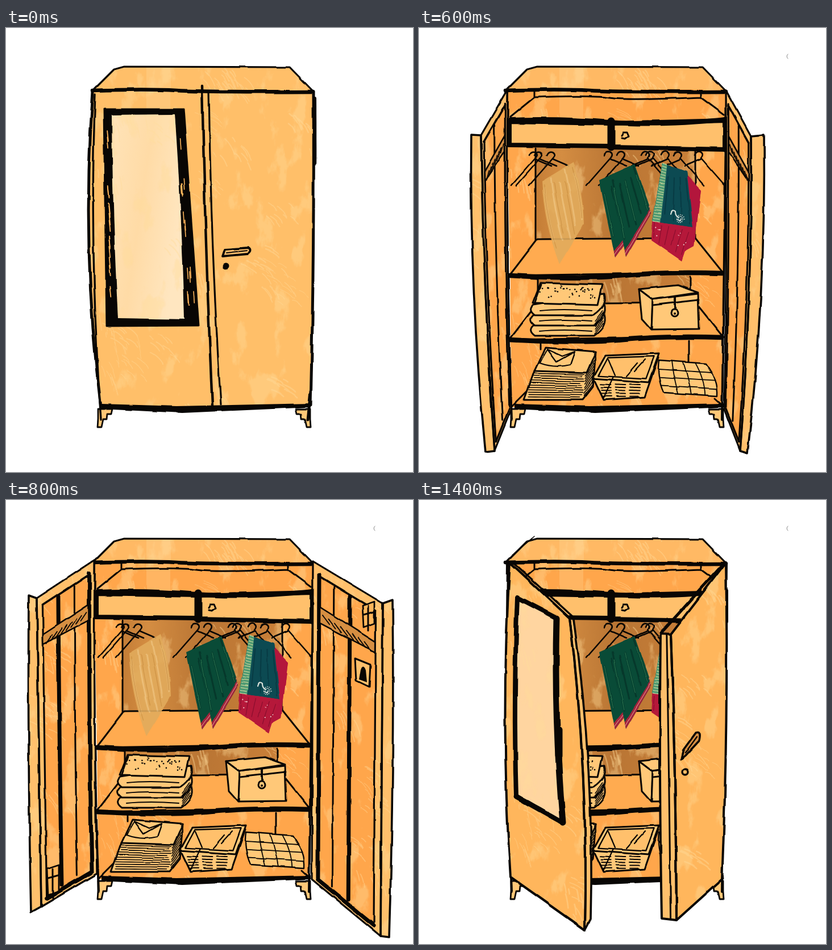
An HTML page for the animation above (1.5 s loop, 716 px wide and 782 px high).

```html
<!DOCTYPE html>
<html lang="en">
<head>
<meta charset="utf-8">
<title>Wardrobe</title>
<style>
html, body { margin: 0; width: 100%; height: 100%; overflow: hidden; background: #fff; }
svg { position: absolute; left: 0; top: 0; width: 716px; height: 782px; }
.layer { opacity: 0; will-change: opacity; }
path { stroke-linecap: round; stroke-linejoin: round; }
</style>
</head>
<body>
<svg viewBox="0 0 716 782">
  <defs>
    <filter id="wobble" filterUnits="userSpaceOnUse" x="0" y="0" width="716" height="782" color-interpolation-filters="sRGB">
      <feTurbulence type="fractalNoise" baseFrequency=".03" numOctaves="1" seed="4"/>
      <feColorMatrix values="1 0 0 0 0  0 1 0 0 0  0 0 1 0 0  0 0 0 0 1" result="noise"/>
      <feDisplacementMap in="SourceGraphic" in2="noise" scale="4" xChannelSelector="R" yChannelSelector="G"/>
    </filter>
    <filter id="wood" filterUnits="userSpaceOnUse" x="0" y="0" width="716" height="782" color-interpolation-filters="sRGB">
      <feTurbulence type="fractalNoise" baseFrequency=".03 .015" numOctaves="5" seed="9"/>
      <feColorMatrix values="0 0 0 0 1  0 0 0 0 .86  0 0 0 0 .6  9 0 0 0 -5.3"/>
    </filter>
    <linearGradient id="glass" x2="1" y2=".4">
      <stop offset="0" stop-color="#ffe3b8"/><stop offset=".5" stop-color="#ffdba6"/><stop offset="1" stop-color="#ffe6c0"/>
    </linearGradient>
    <linearGradient id="back">
      <stop offset="0" stop-color="#c47d36"/><stop offset=".16" stop-color="#d48d42"/>
      <stop offset=".5" stop-color="#b97534"/><stop offset="1" stop-color="#c98039"/>
    </linearGradient>
  </defs>
</svg>
<script>
const LOOP = 1500;
const POSES = [[0, 'shut'], [500, 'ajar'], [600, 'side'], [800, 'wide'], [1300, 'side'], [1400, 'ajar']];
const INK = '#080604', PALE = '#ffc878', EDGE = '#ffc06c', DOOR = '#ffb65c', DEEP = '#ffa64b', BAR = '#d68f42';

let seed = 77;
const rnd = () => (seed = seed * 16807 % 2147483647) / 2147483647;
const span = (a, b) => a + (b - a) * rnd();
const repeat = (n, draw) => Array.from({ length: n }, (_, i) => draw(i, n > 1 ? i / (n - 1) : 0)).join('');

const fill = (d, color) => `<path d="M${d}z" fill="${color}"/>`;
const ink = (d, w = 3, color = INK) => `<path d="M${d}" fill="none" stroke="${color}" stroke-width="${w}"/>`;
const shape = (d, color = PALE, w = 3) => `<path d="M${d}z" fill="${color}" stroke="${INK}" stroke-width="${w}"/>`;
const dot = (x, y, r, color = INK) => `<circle cx="${x}" cy="${y}" r="${r}" fill="${color}"/>`;

// maps (u,v) into four corners; the sides u=0 and u=1 may bulge sideways
function quad(corners, bulge0 = 0, bulge1 = 0) {
  const [ax, ay, bx, by, cx, cy, dx, dy] = corners.split(/[ ,]/).map(Number);
  return (u, v) => {
    const mix = (a, b, c, d) => (1 - v) * (a + (b - a) * u) + v * (d + (c - d) * u);
    const bulge = 4 * v * (1 - v) * (bulge0 + (bulge1 - bulge0) * u);
    return (mix(ax, bx, cx, dx) + bulge).toFixed(1) + ',' + mix(ay, by, cy, dy).toFixed(1);
  };
}
const path = (q, u0, v0, u1, v1) =>
  Array.from({ length: 9 }, (_, i) => q(u0 + (u1 - u0) * i / 8, v0 + (v1 - v0) * i / 8)).join(' ');
const area = (q, u0 = 0, v0 = 0, u1 = 1, v1 = 1) => path(q, u0, v0, u0, v1) + ' ' + path(q, u1, v1, u1, v0);
const down = (q, u, w, v0 = 0, v1 = 1) => ink(path(q, u, v0, u, v1), w);
const across = (q, v, w, u0 = 0, u1 = 1) => ink(path(q, u0, v, u1, v), w);

// loose strokes running down (or across) a quad
const folds = (q, n, w, color) => repeat(n, (i, k) =>
  ink(path(q, .06 + .88 * k, span(.03, .2), .06 + .88 * k, span(.75, .95)), w, color));
const layers = (q, n, w = 1.6) => repeat(n, (i, k) =>
  ink(path(q, span(0, .08), .05 + .9 * k, span(.92, 1), .05 + .9 * k), w));

const marks = repeat(46, () => {
  const x = span(50, 680), y = span(75, 740), a = span(.5, 1.5);
  const strokes = repeat(8, () => {
    const l = span(8, 34), dx = Math.cos(a) * l, dy = Math.sin(a) * l;
    return `M${x + span(-26, 26)},${y + span(-20, 20)}q${dx * .6},${dy * .3} ${dx},${dy}`;
  });
  return ink(strokes.slice(1), span(1, 2.6), '#ffdc9c');
});

function grain(id, ...areas) {
  return `<clipPath id="${id}">${areas.map(a => `<path d="M${a}z"/>`).join('')}</clipPath>
    <g clip-path="url(#${id})"><rect width="716" height="782" filter="url(#wood)" opacity=".4"/>
    <g opacity=".4">${marks}</g><rect x="247" y="66" width="42" height="134" fill="#ffe0a8" opacity=".25"/></g>`;
}

function layer(poses, art) {
  document.body.insertAdjacentHTML('beforeend',
    `<svg class="layer" viewBox="0 0 716 782"><g filter="url(#wobble)">${art}</g></svg>`);
  const frames = POSES.map(([t, pose]) => ({
    offset: t / LOOP, opacity: poses.includes(pose) ? 1 : 0, easing: 'steps(1, end)'
  }));
  frames.push({ ...frames[frames.length - 1], offset: 1 });
  document.body.lastElementChild.animate(frames, { duration: LOOP, iterations: Infinity });
}

const CROWN = '156,107 190,73 208,68 499,69 539,110';
const crown = ink(CROWN, 3.2) + ink('153,110Q250,107 300,110T540,112', 6.5);
const plinth = fill('168,662 300,666 536,661 536,668 310,678 168,671', INK);
const foot = (x, side) =>
  `<g transform="translate(${x} 671) scale(${side} 1)">${shape('0,0v18l-1,14h7l3,-14h6l1,-9h7l2,-9', PALE, 2.8)}</g>`;
const feet = foot(162, 1) + foot(535, -1);

// closed
const body = quad('541,112 153,112 167,668 536,664', 2, -14);
const frame = quad('172,143 312,143 339,524 177,525');
const pane = quad('186,153 297,152 314,513 197,511', -2, 2);
layer(['shut'],
  feet + fill(CROWN, '#ffbf69') + fill(area(body), '#ffbf69') +
  grain('shutGrain', CROWN, area(body)) + crown + plinth +
  down(body, 1, 5) + ink('157,116Q146,390 167,690', 3.4) +
  down(body, 0, 5) + down(body, -.005, 6, .02, .23) + ink('536,640 531,690', 5) +
  ink('345,102Q350,380 363,665', 4.4) + ink('357,112Q360,380 378,663', 3.2) +
  shape(area(frame), INK) + fill(area(pane), 'url(#glass)') + grain('paneGrain', area(pane)) +
  repeat(14, () => { const v = span(.08, .9); return ink(path(frame, .04, v, .05, v + .05), 1.8, DOOR); }) +
  repeat(14, () => { const u = span(.9, .97), v = span(.08, .9); return ink(path(frame, u, v, u, v + .05), 1.6, DOOR); }) +
  shape('381,402 385,390 426,387Q434,392 424,398', EDGE, 3.8) + ink('388,396 424,392', 2) + dot(387, 419, 5.5));

// inside of the wardrobe
function shelf(y) {
  const top = quad(`208,${y - 64} 486,${y - 66} 534,${y - 6} 159,${y}`);
  return fill(area(top), '#ffab50') + ink(area(top) + 'z', 3) + ink(`159,${y}q130,7 200,0t175,-4`, 8.5);
}

function drawer(corners) {
  return shape(area(quad(corners)), EDGE, 8);
}

function hanger(x) {
  const side = x < 390 ? -1 : 1;
  return ink(`${x - 9},224q3,-8 10,-6q7,4 1,11l${side * 42},48M${x + 2},231l${-side * 28},12`, 2.6);
}

const ROOM = '155,108 540,108 533,668 163,668';
const room = fill(CROWN, '#ffb964') + fill(ROOM, DEEP) +
  fill('205,211 485,213 486,372 206,372', 'url(#back)') + fill('209,440 478,435 478,482 209,486', 'url(#back)') +
  grain('roomGrain', CROWN, ROOM) + crown +
  ink('160,157 203,122Q300,118 335,123T495,122L537,153M202,110v13M495,111v11') +
  drawer('159,165 338,168 338,208 159,206') + drawer('340,168 539,163 539,214 340,210') +
  ink('160,162Q250,159 335,166T540,161', 8) + ink('338,164v46', 13) + ink('539,162v52', 10) +
  ink('356,190 359,183 366,183 369,190 362,195 356,194') +
  ink('205,212v160M486,214v156M209,442v42M477,438v42M213,552v14M475,550v38') +
  shelf(436) + shelf(549) + ink('163,667 190,640M520,652 535,666') +
  ink('156,112Q152,400 163,690', 4) + ink('541,112Q536,400 533,690', 4) + plinth;

function blankets() {
  const top = quad('214,449 323,452 315,488 200,485');
  return repeat(3, i => {
    const y = 524 - 18 * i;
    return shape(`201,${y}q-10,9 3,18h104q24,-16 18,-38z`);
  }) + shape(area(top)) + ink('203,487 215,452') +
    repeat(34, () => { const [x, y] = top(span(.05, .95), span(.1, .7)).split(','); return dot(x, y, 1.3); }) +
    repeat(3, i => ink(`212,${498 + 18 * i}q40,-4 92,0`, 2)) + layers(quad('309,518 325,496 325,520 309,540'), 6);
}

function box() {
  return shape('387,460 411,478 409,531 392,512') + shape('411,478 491,468 493,530 409,531') +
    shape('387,460 455,453 491,466 411,478') + ink('412,488 492,479') + ink('450,474v20', 4) +
    `<circle cx="449" cy="502" r="6" fill="${PALE}" stroke="${INK}" stroke-width="3"/>` + dot(449, 503, 2);
}

function linen() {
  const top = quad('222,563 311,570 295,607 203,604');
  return shape('203,604 185,655 288,655 306,632 311,570') + shape(area(top)) +
    ink('226,566 212,590Q240,600 266,593L274,570 252,578zL242,588 274,570', 2.3) +
    layers(quad('200,606 294,608 288,653 186,652'), 11) + layers(quad('294,606 311,578 306,630 289,652'), 9);
}

function basket() {
  const rim = quad('328,577 422,573 404,624 306,617');
  return shape('307,617 325,655 397,650 421,580') + shape(area(rim)) + shape(area(rim, .07, .1, .93, .88), EDGE, 2.4) +
    ink('333,584 345,612M385,590 365,613M342,614 324,653M398,584 380,604', 2.2) +
    repeat(3, i => layers(quad(`${318 + 26 * i},626 ${338 + 26 * i},627 ${338 + 24 * i},650 ${322 + 24 * i},650`), 5, 2));
}

function rumpled() {
  const q = quad('422,585 504,591 524,648 430,642', -4, 6);
  return shape(area(q), PALE, 2.4) + [.28, .52, .78].map(k => down(q, k, 1.8) + across(q, k, 1.8)).join('');
}

function greenCloth() {
  const sheet = corners => {
    const q = quad(corners);
    return fill(area(q), '#094b37') + folds(q, 5, 3, '#06382b') + folds(q, 3, 1, '#2b8056') +
      fill(area(q, 0, .92, 1, 1), '#a3243c') + ink(path(q, 0, .96, 1, .96), 1, '#e7a59a');
  };
  return sheet('317,268 380,240 407,318 345,405') + sheet('336,260 380,240 409,326 364,403');
}

function redCloth() {
  const teal = quad('428,238 471,253 482,350 411,340'), hem = quad('411,340 482,350 462,410 409,374');
  return fill('462,250 496,286 484,384 466,394', '#b3163c') +
    fill(area(teal), '#0c4a52') + folds(teal, 5, 2, '#083b44') +
    fill(area(hem), '#b5183a') + folds(hem, 6, 1.3, '#8c0f2f') +
    fill(area(teal, 0, 0, .2, 1), '#4f9a72') + repeat(22, (i, k) => ink(path(teal, .02, k, .18, k), 1.2, '#c9d59a')) +
    repeat(24, i => dot(459 + Math.cos(i * .55) * (2 + i * .25), 336 + Math.sin(i * .55) * (2 + i * .25), .9, '#dfe4dc')) +
    ink('442,328q2,-9 8,-4q0,8 7,10', 2, '#dfe4dc') +
    repeat(9, () => { const [x, y] = hem(rnd(), span(.2, .8)).split(','); return dot(x, y, 1.1, '#f0c6c8'); });
}

function creamCloth() {
  const q = quad('216,270 272,236 290,345 247,416', -6, 4);
  return `<g opacity=".9">${fill(area(q), '#e2ab5c')}${folds(q, 5, 3, '#edc07a')}${folds(q, 4, 1.4, '#cf9648')}</g>`;
}

layer(['ajar', 'side', 'wide'],
  feet + room + [335, 357, 400, 408].map(hanger).join('') + greenCloth() + redCloth() +
  blankets() + box() + linen() + basket() + rumpled() + ink('649,46q-4,4 0,8', 1, '#8a8a8a'));

layer(['side', 'wide'],
  [203, 212, 234, 435, 457, 494].map(hanger).join('') + creamCloth() + redCloth());

// doors slightly open
const leftFace = quad('265,208 160,110 161,664 292,757', 10, -9);
const leftRim = quad('265,208 272,210 302,738 292,757', 10, 11);
const rightFace = quad('443,236 540,110 533,668 453,740', 2, 4);
const rightRim = quad('425,235 443,236 453,740 427,737', -2, 2);
const mirror = quad('173,172 242,208 253,568 171,522', -3, -5);
layer(['ajar'],
  fill(area(leftFace), DOOR) + fill(area(rightFace), DOOR) + fill(area(leftRim), EDGE) + fill(area(rightRim), EDGE) +
  fill(area(mirror), '#ffd5a0') + grain('ajarGrain', area(leftFace), area(rightFace)) +
  ink(area(leftFace) + 'z', 4) + ink(area(leftRim) + 'z', 3.6) + ink('167,111 270,205', 3.4) +
  ink(area(mirror) + 'z', 8) + down(mirror, 1, 11) + across(mirror, 1, 9) + ink('246,405v45', 13) +
  ink(area(rightFace) + 'z', 4) + ink(area(rightRim) + 'z', 4) + down(rightRim, .6, 3) + ink('538,110 425,235', 5) +
  repeat(9, (i, k) => ink(`${164 + 32 * k},${97 - 27 * k}l7,-6`, 1.5)) +
  shape('461,457 465,440 487,410Q497,406 493,424L468,451', BAR, 3.6) + ink('468,446 489,417', 2.4) +
  `<circle cx="469" cy="479" r="5" fill="none" stroke="${INK}" stroke-width="3.4"/>`);

// inner side of a door: u runs from the hinge to the free edge
function openDoor(id, face, rim, planks, heavy) {
  const bar = area(face, .1, .15, .9, .13) + ' ' + path(face, .9, .13, .9, .16) + ' ' + path(face, .9, .16, .1, .18);
  return fill(area(face), EDGE) + fill(area(rim), EDGE) + fill(area(face, .1, .035, .9, .985), DEEP) +
    grain(id, area(face), area(rim)) + ink(area(face) + 'z', 3.2) + ink(area(rim) + 'z', 3.6) +
    down(face, .09, heavy, .03, .98) + down(face, .9, 3.2, .035, .985) +
    across(face, .035, 3.6, .09, .9) + across(face, .985, heavy, .09, .9) +
    planks.map((u, i) => down(face, u, i ? heavy : 3, .04, .97)).join('') +
    shape(bar, BAR, 2.6) + repeat(8, (i, k) => ink(path(face, .14 + .6 * k, .15, .24 + .6 * k, .165), 1.8));
}

layer(['side'],
  openDoor('sideLeft', quad('156,108 109,189 133,744 162,672', -3, -4), quad('109,189 92,188 117,746 133,744', -4, -8), [.5], 3.4) +
  openDoor('sideRight', quad('540,110 584,190 565,744 537,672', 2, 6), quad('584,190 607,188 578,748 565,744', 6, 9), [.5], 3.4));

const bolt = (x, y, h) => shape(`${x},${y}l21,-7v${h}l-19,7`, DOOR, 2.8) + ink(`${x + 10},${y}v${h + 6}M${x + 2},${y + 16}l18,-5`, 3);
layer(['wide'],
  openDoor('wideLeft', quad('156,106 54,173 62,716 160,658', -2, 0), quad('54,173 40,168 44,726 62,716', 0, -2), [.35, .63], 7) +
  openDoor('wideRight', quad('540,108 663,182 659,768 538,668'), quad('663,182 680,176 674,770 659,768', 0, 3), [.3, .53], 7) +
  bolt(72, 650, 46) + bolt(627, 186, 38) +
  shape('614,279 641,290 639,329 616,318', EDGE) + fill('621,316 624,298Q629,288 633,300L635,321', INK));
</script>
</body>
</html>
```
